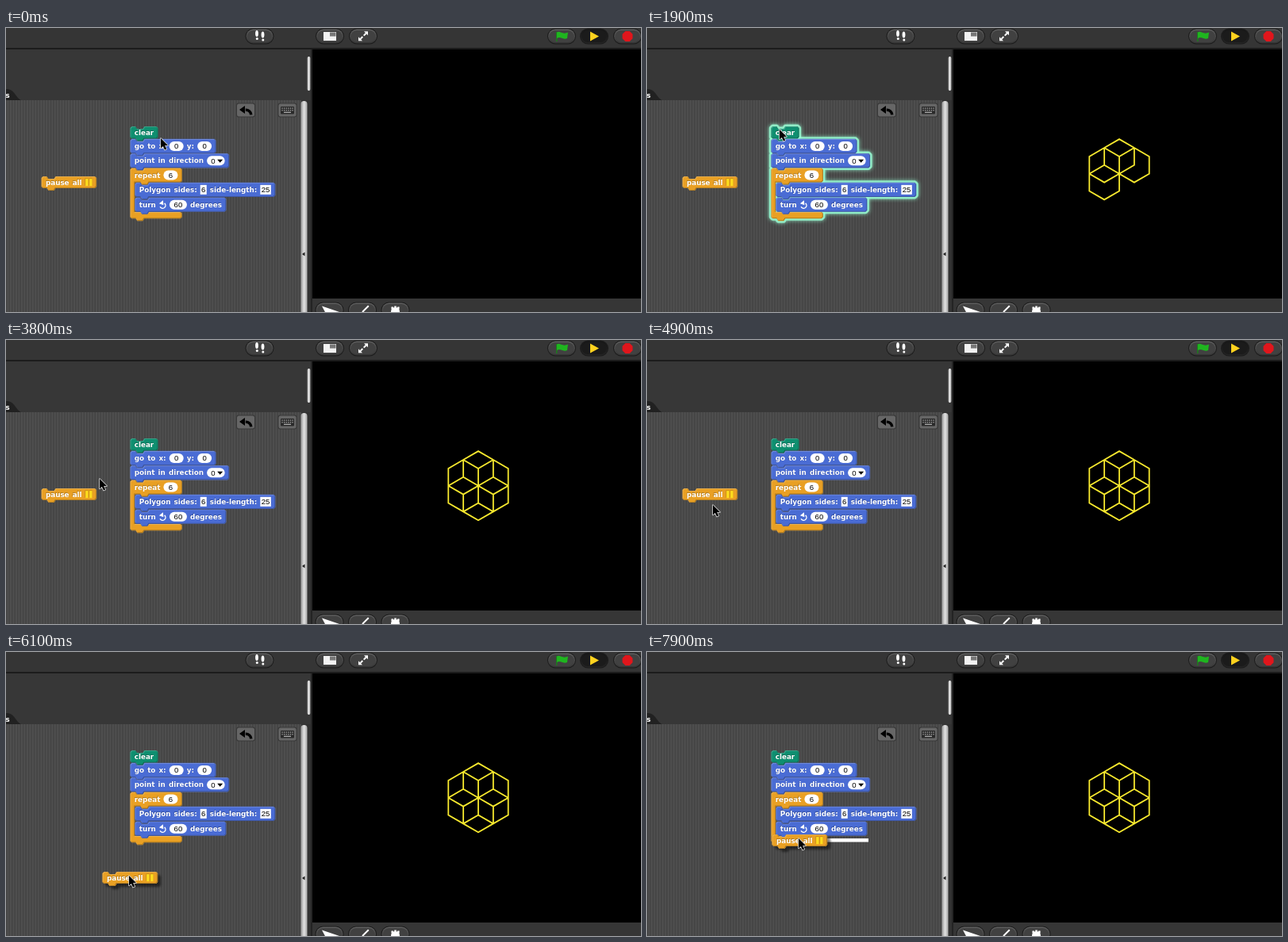
Recreate the animation shown at these times as an HTML page with a canvas. Size 800x358 px, loop 8 s.

```html
<!DOCTYPE html>
<html lang="en">
<head>
<meta charset="utf-8">
<title>Block script</title>
<style>
  html, body { margin: 0; width: 100%; height: 100%; overflow: hidden; background: #000; }
  canvas { display: block; width: 800px; height: 358px; }
</style>
</head>
<body>
<canvas id="stage" width="800" height="358"></canvas>
<script>
const ctx = document.getElementById('stage').getContext('2d');
const LOOP = 8000, STEP = 100, SCALE = 0.871;
const BLUE = '#4a6cd4', TEAL = '#0f8f70', ORANGE = '#e9a024';
const LABEL = 'bold 8.75px "DejaVu Sans", sans-serif';
const VALUE = '9.6px "Liberation Sans", Arial, sans-serif';
const GAP = 4.1, PAD = 5.5, ROW = 18.3;
const PLAY = { run: 1400, draw: 1500, drawn: 2100, stop: 2200, grab: 5500, hint: 7700 };

// Pointer stops: when it leaves the previous one, when it arrives, where
const stops = [
  { from: 300, to: 1000, x: 167, y: 128 },
  { from: 3200, to: 4900, x: 83, y: 208 },
  { from: 4900, to: 5300, x: 78, y: 192 },
  { from: PLAY.grab, to: 6300, x: 160, y: 288 },
  { from: 6300, to: 7100, x: 163, y: 287 },
  { from: 7100, to: 7900, x: 191, y: 235 }
];

const clamp = k => Math.max(0, Math.min(1, k));
const progress = (t, from, to) => clamp((t - from) / (to - from));

function pointerAt(t) {
  let x = 195, y = 139;
  for (const s of stops) {
    const k = progress(t, s.from, s.to), e = k * (2 - k);
    x += (s.x - x) * e;
    y += (s.y - y) * e;
  }
  return [Math.round(x), Math.round(y)];
}

function rect(x, y, w, h, fill) {
  ctx.fillStyle = fill;
  ctx.fillRect(x, y, w, h);
}

function round(x, y, w, h, r, fill) {
  ctx.beginPath();
  ctx.roundRect(x, y, w, h, r);
  ctx.fillStyle = fill;
  ctx.fill();
}

function shape(points, fill) {
  ctx.beginPath();
  for (const [x, y] of points) ctx.lineTo(x, y);
  ctx.closePath();
  ctx.fillStyle = fill;
  ctx.fill();
}

function oval(x, y, rx, ry, fill) {
  ctx.beginPath();
  ctx.ellipse(x, y, rx, ry, 0, 0, 7);
  ctx.fillStyle = fill;
  ctx.fill();
}

function arc(x, y, r, from, to, color, width) {
  ctx.beginPath();
  ctx.arc(x, y, r, from, to);
  ctx.strokeStyle = color;
  ctx.lineWidth = width;
  ctx.stroke();
}

function gradient(x0, y0, x1, y1, ...colors) {
  const g = ctx.createLinearGradient(x0, y0, x1, y1);
  colors.forEach((c, i) => g.addColorStop(i / (colors.length - 1), c));
  return g;
}

// Block parts: each has a width and draws itself at x, centred on cy
function word(str) {
  ctx.font = LABEL;
  return {
    w: ctx.measureText(str).width,
    draw(x, cy) {
      ctx.font = LABEL;
      ctx.fillStyle = 'rgba(0,0,0,.25)';
      ctx.fillText(str, x - 0.6, cy + 2.6);
      ctx.fillStyle = '#fff';
      ctx.fillText(str, x, cy + 3.2);
    }
  };
}

function field(str, w, radius, menu) {
  return {
    w,
    draw(x, cy) {
      round(x, cy - 6, w, 12, radius, '#fff');
      ctx.font = VALUE;
      ctx.fillStyle = '#000';
      ctx.textAlign = 'center';
      ctx.fillText(str, x + w / 2 - (menu ? 3.5 : 0), cy + 3.4);
      ctx.textAlign = 'left';
      const ax = x + w - 6;
      if (menu) shape([[ax - 3.5, cy - 1.5], [ax + 3.5, cy - 1.5], [ax, cy + 2.5]], '#000');
    }
  };
}
const pill = (str, w = 18) => field(str, w, 6);
const slot = (str, w) => field(str, w, 0);

const turnIcon = {
  w: 9,
  draw(x, cy) {
    arc(x + 4.5, cy + 1, 3.6, -0.9, 2.7, '#fff', 1.4);
    shape([[x, cy - 1.5], [x + 5, cy - 5.5], [x + 5.5, cy + 0.5]], '#fff');
  }
};

const pauseIcon = {
  w: 9,
  draw(x, cy) {
    for (const dx of [0.5, 5.5]) {
      rect(x + dx - 0.6, cy - 5, 4, 9, '#b98410');
      rect(x + dx, cy - 4.4, 3.4, 9, '#ffdc1e');
    }
  }
};

// Notched edge, walked right (dir 1) or left (dir -1)
function edge(p, x0, x1, notchX, y, dir) {
  const notch = [[notchX, 0], [notchX + 2, 3], [notchX + 9, 3], [notchX + 11, 0]];
  p.lineTo(x0, y);
  for (const [x, d] of dir > 0 ? notch : notch.reverse()) p.lineTo(x, y + d);
  p.lineTo(x1, y);
}

function block(x, y, h, color, words, mouth) {
  const parts = words.map(w => typeof w === 'string' ? word(w) : w);
  const width = parts.reduce((sum, part) => sum + part.w + GAP, 2 * PAD - GAP);
  const p = new Path2D(), l = x, r = x + width, n = x + 7;
  let b = y + h;
  edge(p, l + 2, r - 2, n, y, 1);
  p.lineTo(r, y + 2);
  p.lineTo(r, b - 2);
  if (mouth) {
    edge(p, r - 2, l + 6, n + 6, b, -1);
    b += mouth;
    p.lineTo(l + 6, b);
    p.lineTo(r - 2, b);
    p.lineTo(r, b + 2);
    b += 8.5;
    p.lineTo(r, b - 2);
  }
  edge(p, r - 2, l + 2, n, b, -1);
  p.lineTo(l, b - 2);
  p.lineTo(l, y + 2);
  p.closePath();
  return { path: p, color, parts, x: x + PAD, cy: y + h / 2 };
}

function drawBlock({ path, color, parts, x, cy }) {
  ctx.fillStyle = color;
  ctx.fill(path);
  ctx.save();
  ctx.clip(path);
  ctx.lineWidth = 1.4;
  for (const [d, tone] of [[0.4, 'rgba(255,255,255,.2)'], [-0.4, 'rgba(0,0,0,.25)']]) {
    ctx.save();
    ctx.translate(d, d);
    ctx.strokeStyle = tone;
    ctx.stroke(path);
    ctx.restore();
  }
  ctx.restore();
  for (const part of parts) {
    part.draw(x, cy);
    x += part.w + GAP;
  }
}

const LEFT = 156.3, TOP = 139.8;
const script = [
  block(LEFT, 124, 15.5, TEAL, ['clear']),
  block(LEFT, TOP, ROW, BLUE, ['go', 'to', 'x:', pill('0'), 'y:', pill('0')]),
  block(LEFT, TOP + ROW, ROW, BLUE, ['point', 'in', 'direction', field('0', 22.5, 6, true)]),
  block(LEFT, TOP + 2 * ROW, ROW, ORANGE, ['repeat', pill('6')], 2 * ROW + 0.5),
  block(LEFT + 6, TOP + 3 * ROW, ROW, BLUE,
    ['Polygon', 'sides:', slot('6', 8), 'side-length:', slot('25', 13.5)]),
  block(LEFT + 6, TOP + 4 * ROW + 0.5, ROW, BLUE, ['turn', turnIcon, pill('60', 22), 'degrees'])
];
const pauseBlock = block(-0.5, 0, 15, ORANGE, ['pause', 'all', pauseIcon]);

function drawScript(running) {
  if (running) {
    ctx.save();
    ctx.shadowColor = 'rgb(153,255,213)';
    ctx.shadowBlur = 5;
    ctx.strokeStyle = 'rgba(153,255,213,.8)';
    ctx.lineWidth = 5;
    ctx.lineJoin = 'round';
    for (const { path } of script) ctx.stroke(path);
    ctx.restore();
  }
  script.forEach(drawBlock);
}

function drawPause(x, y, held) {
  ctx.save();
  ctx.translate(x, y);
  if (held) {
    ctx.save();
    ctx.shadowColor = 'rgba(0,0,0,.5)';
    ctx.shadowBlur = 3;
    ctx.shadowOffsetX = ctx.shadowOffsetY = 4;
    ctx.fillStyle = ORANGE;
    ctx.fill(pauseBlock.path);
    ctx.restore();
  }
  drawBlock(pauseBlock);
  ctx.restore();
}

function button(cx, cy, pressed) {
  const y = cy - 9;
  const shine = pressed ? ['#161616', '#242424'] : ['#626262', '#343434'];
  round(cx - 18, y - 0.5, 36, 20, 10, '#1c1c1c');
  round(cx - 17, y + 0.5, 34, 18, 9, gradient(0, y, 0, y + 18, ...shine));
  round(cx - 15.5, y + 2, 31, 15, 7.5, pressed ? '#1b1b1b' : '#414141');
}

function drawTopBar() {
  rect(0, 0, 800, 27, '#353535');
  rect(0, 25, 800, 2, '#1c1c1c');
  for (const x of [319.5, 408, 450, 700, 783]) button(x, 10);
  button(741, 10, true);

  for (const [x, y] of [[316, 7], [323.5, 8.5]]) {
    oval(x, y, 1.9, 4, '#fff');
    oval(x + 0.3, y + 6.5, 1.5, 1.6, '#fff');
  }

  rect(400, 5, 16, 11, '#f2f2f2');
  rect(408, 5.5, 7.5, 5, '#777');

  for (const turn of [0, Math.PI]) {
    ctx.save();
    ctx.translate(450, 10.3);
    ctx.rotate(turn);
    shape([[1, 5 - 11], [6, -6], [6, -1]], '#fff');
    arc(0, 0, 0.1, 0, 7, '#fff', 0.1);
    ctx.rotate(-Math.PI / 4);
    rect(1, -1, 4, 2, '#fff');
    ctx.restore();
  }

  rect(693, 5, 1.5, 12, '#1c7a1c');
  ctx.beginPath();
  ctx.moveTo(694, 5.5);
  ctx.bezierCurveTo(698, 3, 701, 9, 708, 5.5);
  ctx.lineTo(707, 13);
  ctx.bezierCurveTo(701, 15.5, 699, 10, 694, 13);
  ctx.fillStyle = '#1fb51f';
  ctx.fill();

  shape([[736, 4.5], [747, 10.5], [736, 16.5]], '#ffd21e');
  shape(Array.from({ length: 8 }, (_, i) => {
    const a = (i + 0.5) * Math.PI / 4;
    return [783 + 7 * Math.cos(a), 10.5 + 7 * Math.sin(a)];
  }), '#e0161c');
}

function drawEditor() {
  rect(0, 27, 386, 331, '#373737');
  ctx.beginPath();
  ctx.moveTo(0, 77);
  ctx.bezierCurveTo(12, 77, 11, 88, 20, 91.5);
  ctx.lineTo(0, 91.5);
  ctx.fillStyle = '#212121';
  ctx.fill();
  ctx.font = LABEL;
  ctx.fillStyle = '#fff';
  ctx.fillText('s', -0.5, 87.5);

  rect(0, 91, 372, 267, '#4f4f4f');
  for (let x = 0; x < 372; x += 4 * SCALE) rect(x, 91, 1.5, 267, '#444');

  rect(372, 91, 14, 267, '#323232');
  round(371.5, 92, 8, 275, 4, gradient(371.5, 0, 379.5, 0, '#999', '#e0e0e0', '#aaa'));
  shape([[373, 285], [376.5, 282.5], [376.5, 287.5]], '#222');
  round(379.5, 36, 4, 43, 2, gradient(379.5, 0, 383.5, 0, '#999', '#eee', '#999'));
  rect(384, 27, 2, 331, '#242424');

  for (const x of [290, 342.5]) {
    round(x, 94.5, 24, 18, 3, '#383838');
    round(x + 1, 95.5, 22, 16, 2.5, '#666');
  }
  shape([[294, 103], [301, 98], [301, 108]], '#000');
  arc(302, 110, 6.8, -1.6, -0.1, '#000', 3.5);
  round(346, 99, 17, 9.5, 1, '#2a2a2a');
  for (let i = 0; i < 12; i++)
    rect(347.4 + i % 6 * 2.6, 100.5 + Math.floor(i / 6) * 2.6, 1.3, 1.3, '#aaa');
  rect(350, 105.7, 9, 1.3, '#aaa');
}

function drawStage(t) {
  rect(386, 27, 414, 314, '#000');
  rect(386, 341, 414, 17, '#363636');
  for (const x of [407.5, 449, 490.5]) button(x, 355);
  shape([[398, 350.5], [420, 358], [403, 360]], '#fff');
  ctx.save();
  ctx.translate(449, 358);
  ctx.rotate(-Math.PI / 4);
  rect(0, -1, 11, 2, '#fff');
  ctx.restore();
  oval(490.5, 357.5, 5.5, 5.5, '#fff');
  for (let i = -1; i < 2; i++) rect(489.2 + i * 3.8, 350.5 + Math.abs(i), 2.6, 3, '#fff');

  // Six hexagons, each turned 60 degrees to the left of the last
  const count = Math.floor(progress(t, PLAY.draw, PLAY.drawn) * 36);
  if (!count) return;
  let x = 595, y = 183.7;
  ctx.beginPath();
  ctx.moveTo(x, y);
  for (let n = 0; n < count; n++) {
    const heading = (n % 6 - Math.floor(n / 6)) * Math.PI / 3;
    x += 25 * SCALE * Math.sin(heading);
    y -= 25 * SCALE * Math.cos(heading);
    ctx.lineTo(x, y);
  }
  ctx.strokeStyle = '#f7e92e';
  ctx.lineWidth = 1.8;
  ctx.stroke();
}

function drawPointer(x, y) {
  ctx.save();
  ctx.translate(x, y);
  shape([[0, 0], [0, 12.5], [2.9, 9.9], [5, 14.6], [7.2, 13.6], [5.1, 9], [9, 9]], '#000');
  ctx.lineJoin = 'round';
  ctx.lineWidth = 1.5;
  ctx.strokeStyle = '#ddd';
  ctx.stroke();
  ctx.fill();
  ctx.restore();
}

function draw(t) {
  const [px, py] = pointerAt(t), held = t >= PLAY.grab;
  drawEditor();
  drawStage(t);
  drawTopBar();
  drawScript(t >= PLAY.run && t < PLAY.stop);
  if (t >= PLAY.hint) rect(163, 235, 116, 4.5, '#fff');
  drawPause(held ? px - 33 : 45, held ? py - 5 : 187, held);
  drawPointer(px, py);
}

const start = performance.now();
function frame(now) {
  const t = Math.max(0, now - start) % LOOP;
  draw(Math.floor(t / STEP) * STEP);
  requestAnimationFrame(frame);
}
draw(0);
requestAnimationFrame(frame);
</script>
</body>
</html>
```
